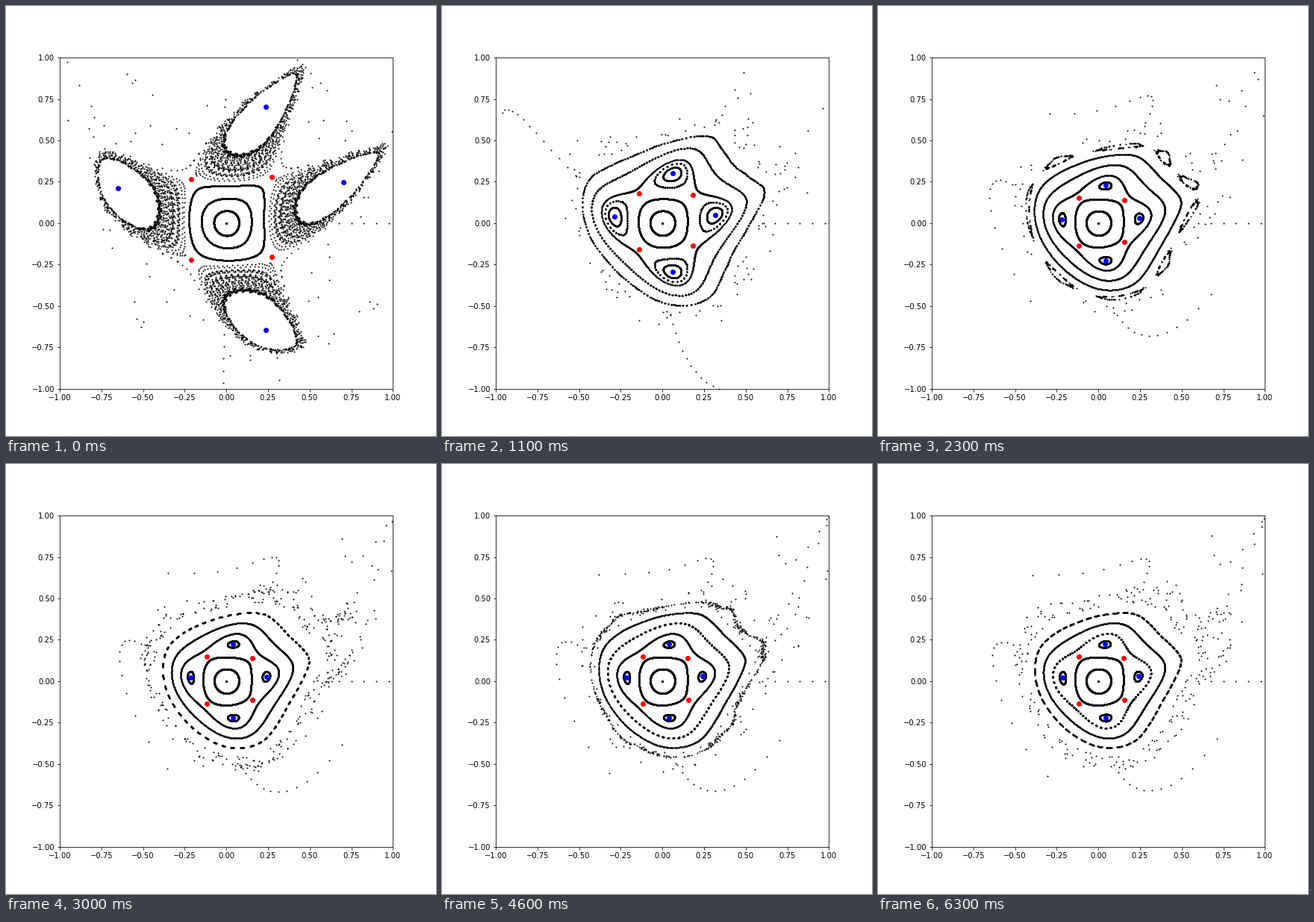
These frames come from a looping animation (576x576 px, 6.4 s). A matplotlib script:

```python
import numpy as np
import matplotlib.pyplot as plt
from matplotlib.animation import FuncAnimation

FRAMES = 64
INTERVAL = 100
TURNS = 1000
STARTS = np.linspace(0, 1.5, 21)

# One turn is split into three equal rotations, each followed by a sextupole kick.
PHASE = 2 * np.pi * 0.255 / 3
COS, SIN = np.cos(PHASE), np.sin(PHASE)


def strengths(t):
    """Strengths of the two free sextupoles at frame time t."""
    growth = -3.07 + 0.335 * t - 0.0034 * t * (t - 6)
    mean = 0.373 / (1 + np.exp(-growth)) - 0.0001 * np.maximum(t - 39, 0)
    split = np.interp(t, [0, 17, 30, 39, 63], [0, 0.004, -0.001, 0, 0.0145])
    return mean + split, mean - split


def turn(x, p, k1, k2):
    for k in (k1, k2, 1.0):
        x, p = COS * x + SIN * p, COS * p - SIN * x
        p = p + k * x * x
    return x, p


def track_all():
    """Positions of every orbit, indexed by turn, frame and start."""
    k1, k2 = (k[:, None] for k in strengths(np.arange(FRAMES)))
    x = np.tile(STARTS, (FRAMES, 1))
    p = np.zeros_like(x)
    xs, ps = [x], [p]
    for _ in range(TURNS):
        x, p = turn(x, p, k1, k2)
        lost = ~(np.hypot(x, p) < 10)
        x, p = np.where(lost, np.nan, x), np.where(lost, np.nan, p)
        xs.append(x)
        ps.append(p)
    return np.array(xs), np.array(ps)


def four_turns(z, k1, k2):
    x, p = z
    for _ in range(4):
        x, p = turn(x, p, k1, k2)
    return np.array([x, p])


def fixed_point(z, k1, k2, eps=1e-6):
    """Newton search for a point of period four near z."""
    for _ in range(12):
        cols = [(four_turns(z + d, k1, k2) - four_turns(z - d, k1, k2)) / (2 * eps)
                for d in eps * np.eye(2)]
        slope = np.array(cols).T - np.eye(2)
        step = np.linalg.lstsq(slope, four_turns(z, k1, k2) - z, rcond=None)[0]
        step *= min(1, 0.03 / (np.linalg.norm(step) + 1e-15))
        z = z - step
    return z


def follow(guess, substeps=4):
    """The four points of one cycle for each frame."""
    z, cycles = np.array(guess), []
    for i in range((FRAMES - 1) * substeps + 1):
        k1, k2 = strengths(i / substeps)
        z = fixed_point(z, k1, k2)
        if i % substeps == 0:
            cycle = [tuple(z)]
            for _ in range(3):
                cycle.append(turn(*cycle[-1], k1, k2))
            cycles.append(np.array(cycle).T)
    return cycles


orbit_x, orbit_p = track_all()
stable = follow((0.70, 0.243))
unstable = follow((0.272, 0.275))

fig = plt.figure(figsize=(8, 8), dpi=72)
ax = fig.add_subplot()
ax.set_xlim(-1, 1)
ax.set_ylim(-1, 1)
dots, = ax.plot([], [], "o", color="black", markersize=1)
red, = ax.plot([], [], "o", color="red", markersize=6)
blue, = ax.plot([], [], "o", color="blue", markersize=6)


def update(i):
    x, p = orbit_x[:, i].ravel(), orbit_p[:, i].ravel()
    seen = (np.abs(x) < 1.01) & (np.abs(p) < 1.01)
    dots.set_data(x[seen], p[seen])
    red.set_data(*unstable[i])
    blue.set_data(*stable[i])
    return dots, red, blue


anim = FuncAnimation(fig, update, frames=FRAMES, interval=INTERVAL,
                     repeat=True, repeat_delay=0)
plt.show()
```
